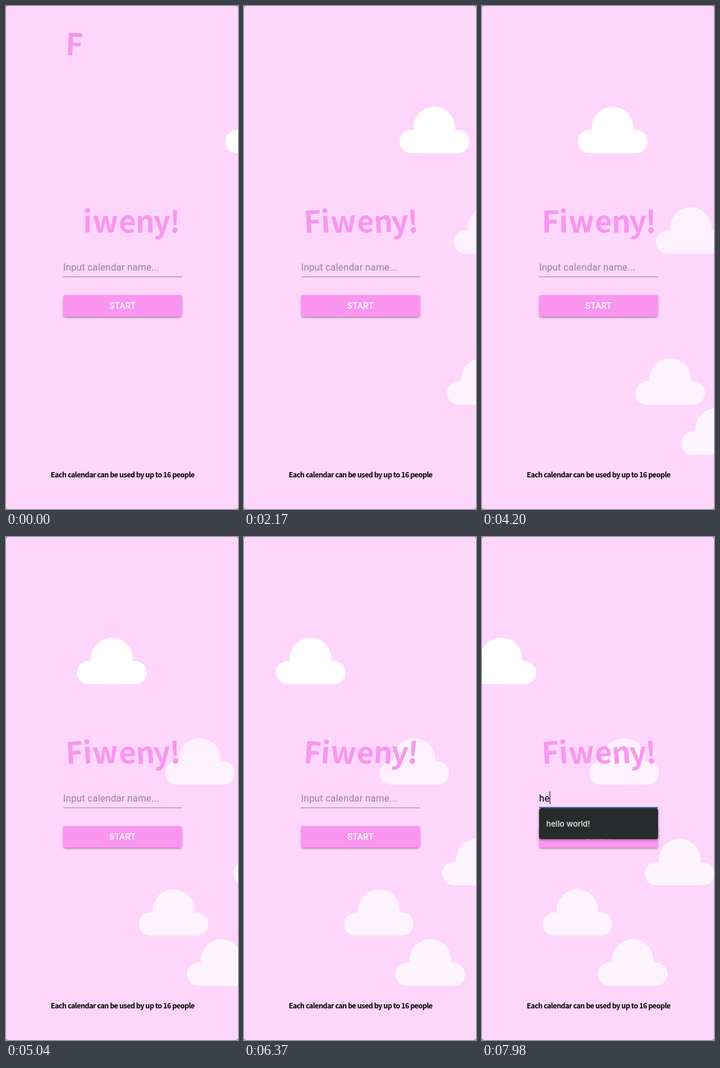
Animation of 390x844 px, one loop 8 s. Source, as an HTML page:

```html
<!DOCTYPE html>
<html lang="en">
<head>
<meta charset="utf-8">
<title>Calendar start</title>
<style>
  html, body { margin: 0; width: 100%; height: 100%; overflow: hidden; background: #3a363a; }
  svg { display: block; width: 100vw; height: 100vh; }
  .title { font: 700 50px "Noto Sans CJK KR", "Noto Sans CJK JP", "Noto Sans CJK", sans-serif; fill: #f896ee; text-anchor: middle; }
  .field { font: 400 16px Roboto, sans-serif; letter-spacing: .15px; }
  .button { font: 500 14px Roboto, sans-serif; letter-spacing: .4px; fill: #fff; text-anchor: middle; }
  .note { font: 700 12px "Noto Sans CJK KR", "Noto Sans CJK JP", "Noto Sans CJK", sans-serif; letter-spacing: -.55px; text-anchor: middle; }
  .menu text { font: 500 13.3px Inter, sans-serif; fill: #f4f4f4; }
  .menu .ko { font: 500 12.3px "Noto Sans CJK KR", "Noto Sans CJK JP", "Noto Sans CJK", sans-serif; }
  .menu rect { filter: drop-shadow(0 1px 2px rgba(0,0,0,.4)); }
</style>
</head>
<body>
<svg viewBox="0 0 390 844">
  <defs>
    <path id="cloud" d="M19.5 39H23.5V35a35 35 0 0 1 70 0V39h4a19.5 19.5 0 0 1 0 39h-78a19.5 19.5 0 0 1 0 -39z"/>
  </defs>
  <rect width="390" height="844" rx="3" fill="#fed6fc"/>
  <g id="clouds" fill="#fff"></g>
  <g id="title" class="title"></g>
  <text id="hint" class="field" x="96" y="444" fill="#000" fill-opacity=".4">Input calendar name...</text>
  <text id="typed" class="field" x="96" y="444"></text>
  <rect id="caret" y="427" width="1" height="21"/>
  <rect x="96" y="454" width="200" height="1" fill="#000" fill-opacity=".42"/>
  <rect id="focus" y="453" height="2" fill="#2f72cc"/>
  <g id="shadow"></g>
  <rect x="96" y="485" width="200" height="36.5" rx="4" fill="#fa95f0"/>
  <text class="button" x="196" y="508">START</text>
  <g id="menu" class="menu"></g>
  <text class="note" x="196" y="791">Each calendar can be used by up to 16 people</text>
</svg>
<script>
const LOOP = 8000, OPEN = 6600, KEY_H = 7500, KEY_E = 7770, LAND = 1150;
const $ = id => document.getElementById(id);

function add(parent, tag, attrs, text) {
  const el = document.createElementNS(parent.namespaceURI, tag);
  for (const key in attrs) el.setAttribute(key, attrs[key]);
  if (text) el.textContent = text;
  return parent.appendChild(el);
}

// start x, speed in px/ms, top, opacity
const clouds = [
  [369, .0495, 169, 1],
  [416.6, .0296, 337.5, .66],
  [430.8, .0412, 591, .7],
  [491, .0371, 675, .74],
  [568, .0369, 506.5, .74]
].map(([x, speed, y, opacity]) => ({
  x, speed, y, el: add($("clouds"), "use", { href: "#cloud", opacity })
}));

// inset, drop, blur, opacity
for (const [inset, drop, blur, opacity] of [[2, 3, .5, .2], [0, 2, 1, .14], [0, 1, 2.5, .12]])
  add($("shadow"), "rect", {
    x: 96 + inset, y: 485 + inset + drop, width: 200 - 2 * inset, height: 36.5 - 2 * inset,
    rx: 4, opacity, style: `filter: blur(${blur}px)`
  });

const centers = [115, 137, 167, 204, 234, 262, 284];
const letters = [..."Fiweny!"].map((ch, i) =>
  add($("title"), "text", { x: centers[i], y: 380 }, ch));

const menus = [
  ["asdf", "가나다가나다가나다가나다", "새달력!", "hi", "wer", "qwer"],
  ["hi", "hello world!"],
  ["hello world!"]
].map(items => {
  const g = add($("menu"), "g", {});
  add(g, "rect", { x: 96, y: 455, width: 200, height: 16 + 36 * items.length, rx: 4, fill: "#282b2c" });
  items.forEach((item, i) => add(g, "text",
    { x: 108, y: 486 + 36 * i, class: /[가-힣]/.test(item) ? "ko" : "" }, item));
  return g;
});

const clamp = v => Math.max(0, Math.min(1, v));
const show = (el, on) => el.setAttribute("visibility", on ? "visible" : "hidden");

function drawTitle(t) {
  const sway = t < 1100 ? 0 : -4 * Math.sin((t - 1100) / 3000 * 2 * Math.PI);
  const drop = -298 * (1 - Math.sin(clamp(t / LAND) * Math.PI / 2));
  const lean = (2.5 + 2.5 * clamp(t / 1050)) * (1 - clamp((t - 1050) / 150));
  letters.forEach((el, i) => {
    const dy = i ? 0 : drop, angle = sway + (i ? 0 : lean);
    el.setAttribute("transform", `translate(0 ${dy}) rotate(${angle} ${centers[i]} 362)`);
  });
}

function drawField(t) {
  const open = t >= OPEN;
  const step = t < KEY_H ? 0 : t < KEY_E ? 1 : 2;
  const typed = "he".slice(0, step);
  if ($("typed").textContent !== typed) $("typed").textContent = typed;
  show($("hint"), !step);
  menus.forEach((el, i) => show(el, open && i === step));

  const since = t - [OPEN, KEY_H, KEY_E][step];
  show($("caret"), open && since % 1000 < 500);
  $("caret").setAttribute("x", step ? 96 + $("typed").getComputedTextLength() : 96);

  const grow = 1 - (1 - clamp((t - OPEN) / 200)) ** 3;
  $("focus").setAttribute("x", 196 - 100 * grow);
  $("focus").setAttribute("width", 200 * grow);
}

function draw(t) {
  for (const c of clouds)
    c.el.setAttribute("transform", `translate(${c.x - c.speed * t} ${c.y})`);
  drawTitle(t);
  drawField(t);
}

const start = performance.now();
function tick() {
  draw((performance.now() - start) % LOOP);
  requestAnimationFrame(tick);
}
tick();
</script>
</body>
</html>
```
